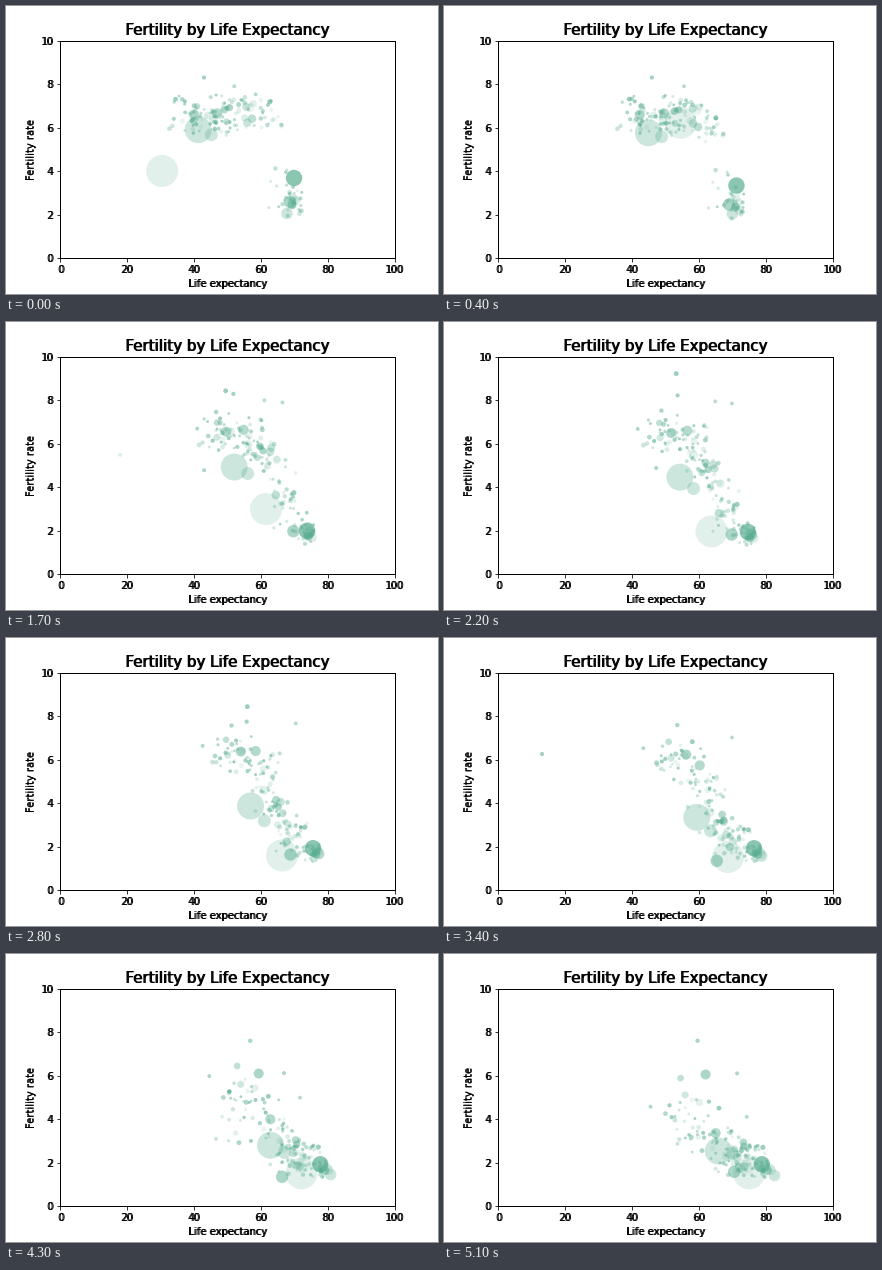
Write a matplotlib script that moves like this. It is 432 px wide and 288 px high and loops after 5.2 s.

```python
import numpy as np
import matplotlib.pyplot as plt
from matplotlib.animation import FuncAnimation

FRAMES = 52
GREEN = (90 / 255, 174 / 255, 145 / 255)
T = np.arange(FRAMES)
rng = np.random.default_rng(11)

paths, radii, colors = [], [], []


def fall(turn, width):
    """S-curve from 0 on the first frame to 1 on the last."""
    s = 1 / (1 + np.exp((turn - T) / width))
    return (s - s[0]) / (s[-1] - s[0])


def pulse(when, span):
    return np.exp(-((T - when) / span) ** 2)


def bubble(r, alpha, life, fert, turn, width=6, shift=(0, 0), when=0, span=1):
    """Life rises, fertility falls; shift is a passing (life, fertility) event."""
    rise = (T / (FRAMES - 1)) ** 0.75
    event = pulse(when, span)
    x = life[0] + (life[1] - life[0]) * rise + shift[0] * event
    y = fert[0] + (fert[1] - fert[0]) * fall(turn, width) + shift[1] * event
    paths.append(np.column_stack([x, y]))
    radii.append(r)
    colors.append((*GREEN, alpha))


def crowd(n, start, end, high, low, turns, spread=2.5, size=(1.4, 2.6),
          width=6, dip=0):
    """Seeded bubbles; the longer-lived ones turn earlier."""
    for u in rng.uniform(0, 1, n):
        a, b, turn = (p + (q - p) * u for p, q in (start, end, turns))
        a, b = rng.normal((a, b), spread)
        r = size[0] + (size[1] - size[0]) * rng.uniform() ** 2
        bubble(r, rng.uniform(0.1, 0.6), (min(a, 74), min(b, 83)),
               (rng.uniform(*high), rng.uniform(*low)),
               turn + rng.normal(0, 4), width, (dip, 0), 45, 8)


# Largest populations
bubble(16, 0.18, (51, 75), (6.4, 1.5), 14, 3.5, (-20.5, -2.4), 0, 1.4)
bubble(13.5, 0.3, (41.3, 65.8), (5.9, 2.53), 24, 10)
bubble(8.2, 0.7, (69.9, 78.8), (3.68, 1.92), 7, 3)
bubble(6.5, 0.3, (45.2, 70), (5.67, 2.4), 21)
bubble(6.2, 0.5, (68.7, 71), (2.58, 1.6), 10, 8, (-6.5, -0.4), 38, 8)
bubble(5.8, 0.3, (67.8, 82.6), (2.05, 1.4), 26, 8)
bubble(5, 0.5, (40, 62), (6.6, 6.05), 30, 6, (-14.4, 0), 9, 3)
bubble(5.1, 0.45, (46.9, 65), (6.65, 3.35), 38, 4)

# Medium populations
crowd(4, (69.5, 71), (80.5, 82), (2.4, 2.8), (1.3, 2), (10, 8), 0.3, (4, 4.8), 4)
crowd(6, (55, 59), (71, 76), (6.1, 7.1), (1.5, 2.5), (24, 16), 1, (3.6, 4.5))
crowd(5, (45, 51), (68, 74), (6.2, 7), (2, 3), (30, 22), 1, (3.4, 4.4))
crowd(3, (40, 45), (56, 62), (6.2, 7), (4.7, 6), (46, 44), 1, (3.3, 4))

# Outliers with a sudden event
bubble(2, 0.2, (42, 70), (6.5, 2.7), 38, 6, (-36.3, -0.9), 17, 2.6)
bubble(2.1, 0.55, (43, 63), (8.3, 4.8), 33, 3, (-44.6, 0), 34, 1.1)
bubble(2.4, 0.6, (34.5, 66), (7.3, 4.5), 38, 4, (2, 2), 23, 8)
bubble(2, 0.4, (45, 75), (7.4, 2.8), 31, 4, (4, 1), 21, 7)
bubble(2.2, 0.5, (36.5, 59.6), (7.3, 7.6), 16)
bubble(2, 0.5, (34, 71.4), (6.4, 6.1), 25, 6, (-8, -1.7), 19, 7)
bubble(1.9, 0.45, (52, 74.3), (7.9, 4.1), 39, 4, (6, 0), 22, 10)

# Everyone else
crowd(24, (67.5, 72.5), (76.5, 81.5), (1.9, 3.4), (1.3, 2.1), (14, 8), 1.3, width=4)
crowd(11, (64, 70), (69, 77), (2.1, 4.2), (1.3, 2), (22, 12), 1.5)
crowd(46, (47, 65), (70, 77), (5.9, 7.6), (1.6, 2.8), (33, 2))
crowd(26, (40, 54), (62, 72), (5.8, 7.5), (2, 3.6), (42, 27), 3)
crowd(26, (34, 46), (52, 63), (5.7, 7.3), (3, 5), (48, 40), 3)
crowd(8, (47, 54), (64, 70), (5.6, 7.2), (2.4, 4), (33, 26), 2, dip=-15)

paths = np.array(paths)
sizes = (2 * np.array(radii)) ** 2

plt.rcParams.update({"font.family": "DejaVu Sans", "font.size": 10})
fig = plt.figure(figsize=(6, 4), dpi=72, facecolor="white")


def make_axes(dx=0):
    ax = fig.add_axes([0.125 + dx / 432, 0.125, 0.775, 0.755],
                      label=f"layer {dx}", facecolor="none")
    ax.set(xlim=(0, 100), ylim=(0, 10),
           xlabel="Life expectancy", ylabel="Fertility rate")
    ax.set_title("Fertility by Life Expectancy", fontsize=15)
    return ax


ax = make_axes()
ax.spines[:].set_linewidth(1)

# A second print of the lettering, one pixel over, makes it heavier.
heavy = make_axes(dx=1)
heavy.spines[:].set_visible(False)
heavy.tick_params(length=0, pad=7)

bubbles = ax.scatter(*paths[:, 0].T, s=sizes, c=colors, linewidths=0)


def update(i):
    bubbles.set_offsets(paths[:, i])
    return (bubbles,)


anim = FuncAnimation(fig, update, frames=FRAMES, interval=100,
                     repeat=True, repeat_delay=0, blit=False)
plt.show()
```
